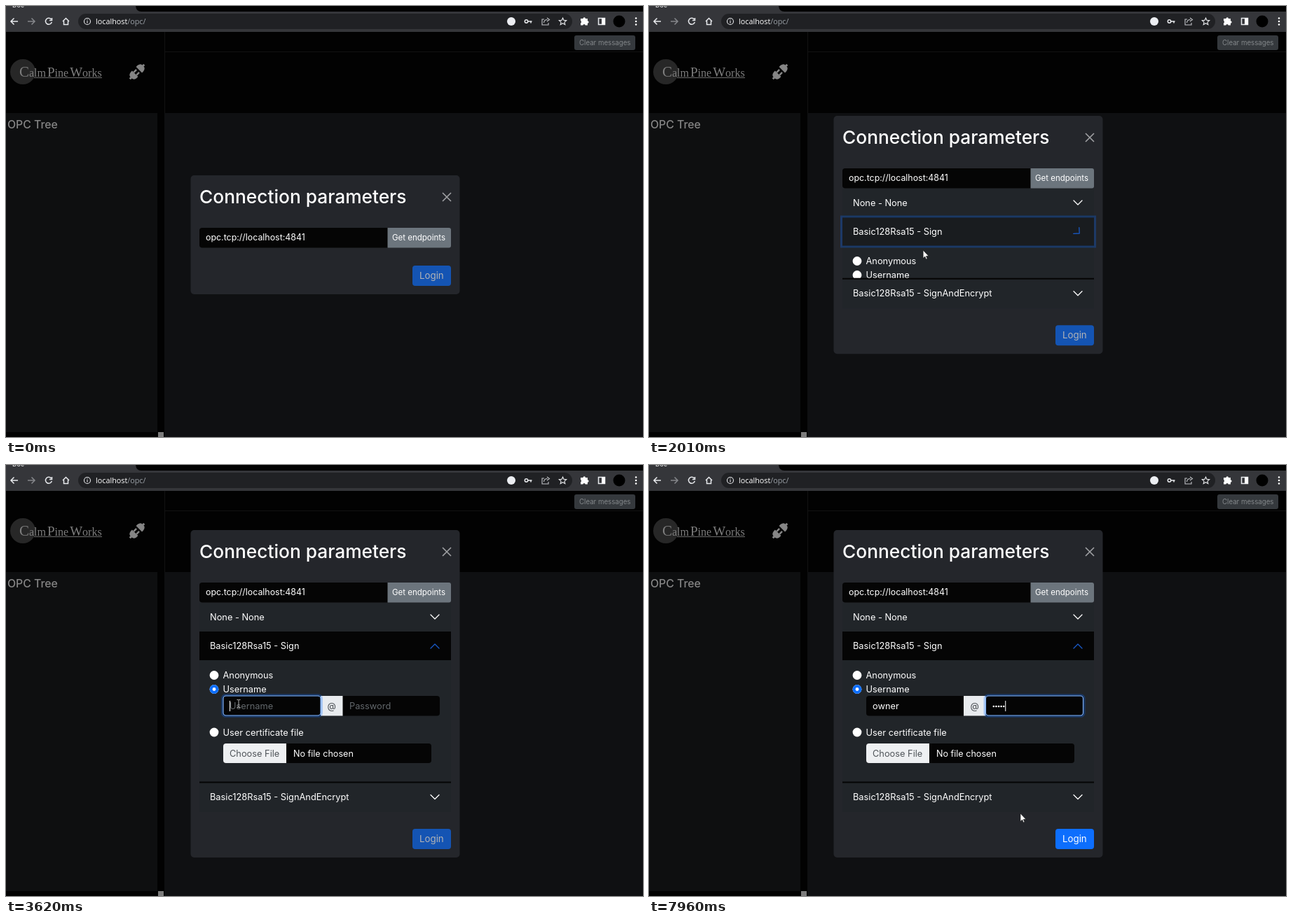
These frames come from a looping animation (909x616 px, 7.99 s). An HTML page:

```html
<!DOCTYPE html>
<html lang="en">
<head>
<meta charset="utf-8">
<title>Connection parameters</title>
<style>
html, body { margin: 0; width: 100%; height: 100%; overflow: hidden; background: #000; }
svg { display: block; width: 909px; height: 616px; font: 12.8px Inter, sans-serif; }
text { white-space: pre; }
.line { fill: none; stroke: #e8eaed; stroke-width: 1.5; }
.light { fill: #fff; }
.field { fill: #050505; }
.item { fill: #212529; }
.hint { fill: #62676b; }
.chev { fill: none; stroke: #fff; stroke-width: 1.3; stroke-linecap: round; stroke-linejoin: round; }
.ring rect, .ring circle { fill: none; stroke: #0d6efd; stroke-opacity: .28; stroke-width: 3; }
.ring .edge { stroke: #86b7fe; stroke-opacity: 1; stroke-width: 1.1; }
</style>
</head>
<body>
<svg viewBox="0 0 909 616">
  <defs><clipPath id="clip"><rect id="clipBox" x="270" y="186" width="370"/></clipPath></defs>

  <!-- browser bar -->
  <rect width="909" height="616" fill="#020202"/>
  <path d="M0 0H185Q186 8 193 8H909V37H0Z" fill="#35363a"/>
  <text x="9" y="1.5" font-size="9" class="light">Doc</text>
  <rect x="103" y="11" width="705" height="22" rx="11" fill="#202124"/>
  <g class="line">
    <path d="M17 22H7M11.5 17.5L7 22l4.5 4.5"/>
    <path d="M31 22h10M36.5 17.5L41 22l-4.5 4.5" stroke="#85878b"/>
    <path d="M64.5 19A4.5 4.5 0 1 0 65.3 23M65.5 17v3.5h-3.5"/>
    <path d="M81 22l4.5-4.5L90 22M82.5 21.5v5h6v-5"/>
    <g stroke-width="1.1">
      <circle cx="116" cy="22" r="4.5"/><path d="M116 21.3v3.2M116 19.3v1"/>
      <path d="M768 19h-3v8h9v-3M767.5 24q.5-4.5 5-4.5M772 17l3.5 2.5-3.5 2.5" stroke="#c4c6ca"/>
      <path d="M794.5 17l1.5 3.4 3.7.3-2.8 2.4.9 3.6-3.3-2-3.3 2 .9-3.6-2.8-2.4 3.7-.3z"/>
    </g>
    <rect x="845.5" y="17.5" width="9" height="9"/>
  </g>
  <text x="128" y="26" font-family="'Open Sans', sans-serif" font-size="10.8" class="light">localhost<tspan fill="#9aa0a6">/opc/</tspan></text>
  <circle cx="721" cy="22" r="6" fill="#eceef2"/>
  <g id="key" class="line" stroke-width="1.3"><circle cx="742.5" cy="22" r="2.2"/><path d="M745 22h5.5M749 22v2.5"/></g>
  <path d="M820 18h3.5a1.7 1.7 0 0 1 3.4 0h3v3.3a1.7 1.7 0 0 1 0 3.4v2.8h-3.3a1.6 1.6 0 0 0-3.2 0H820v-3.3a1.6 1.6 0 0 0 0-3z" class="light"/>
  <rect x="850" y="17.5" width="5" height="9" class="light"/>
  <circle cx="875" cy="22" r="8.5"/>
  <g class="light"><circle cx="899" cy="17.5" r="1.3"/><circle cx="899" cy="22" r="1.3"/><circle cx="899" cy="26.5" r="1.3"/></g>

  <!-- page behind the dialog -->
  <rect y="153" width="216" height="456" fill="#0e0f10"/>
  <rect x="226" y="153" width="683" height="463" fill="#0f1012"/>
  <path d="M226.5 37V153M226 65.5H909" stroke="#121212"/>
  <rect x="217" y="609" width="8" height="7" fill="#7c7c7c"/>
  <circle cx="24" cy="94" r="18" fill="#272727"/>
  <text x="19" y="101" font-family="'Liberation Serif', serif" font-size="16" fill="#7d7d7d"><tspan font-size="21">C</tspan>alm<tspan font-size="19" dx="2">P</tspan>ine<tspan font-size="19" dx="2">W</tspan>orks</text>
  <path d="M40 102.5H137" stroke="#6c6c6c"/>
  <g transform="translate(187 94) rotate(-45)" fill="#858585">
    <path d="M-4-6v12h-3q-5-1-5-4.500h-2.500v-3h2.500q0-3.500 5-4.500zM4-6v12h3q5-1 5-4.500h2.500v-3h-2.500q0-3.500-5-4.500z"/>
    <path d="M-4-4h5.500v2.500h-5.500zM-4 1.500h5.500v2.500h-5.500z"/>
  </g>
  <text x="2" y="175" font-size="15.8" font-weight="500" fill="#858585">OPC Tree</text>
  <rect x="811" y="42" width="87" height="21" rx="3" fill="#35393d"/>
  <text x="818" y="56" font-size="9.7" fill="#83878a">Clear messages</text>

  <!-- dialog, y measured from its top edge -->
  <g id="modal">
    <rect id="panel" x="263.5" width="384" rx="5" fill="#24262b"/>
    <text x="276" y="40" font-size="26.3" font-weight="500" class="light">Connection parameters</text>
    <path d="M623 25l12 12M635 25l-12 12" stroke="#a0a1a4" stroke-width="1.6"/>
    <path d="M545 75H280a4 4 0 0 0-4 4v20.500a4 4 0 0 0 4 4H545z" class="field"/>
    <text x="285" y="93.3" font-size="12.4" class="light">opc.tcp://localhost:4841</text>
    <path d="M544.5 75h87.500a3 3 0 0 1 3 3v22.500a3 3 0 0 1-3 3h-87.500z" fill="#6c757d"/>
    <path id="hover" d="M544.5 75h87.500a3 3 0 0 1 3 3v22.500a3 3 0 0 1-3 3h-87.500z" fill="#565d63"/>
    <text x="551" y="93" font-size="11.5" class="light">Get endpoints</text>

    <g id="list">
      <rect x="276" y="104" width="359" height="82.5" class="item"/>
      <text x="291" y="128.5" class="light">None - None</text>
      <path d="M606 121l6 6 6-6" class="chev"/>
      <g clip-path="url(#clip)">
        <rect x="276" y="186" width="359" height="175" class="item"/>
        <g class="light">
          <circle cx="297" cy="207.5" r="6.4"/>
          <circle cx="297" cy="227.5" r="6.4"/>
          <circle cx="297" cy="289" r="6.4"/>
          <text x="309.5" y="212">Anonymous</text>
          <text x="309.5" y="232">Username</text>
          <text x="309.5" y="293.5">User certificate file</text>
        </g>
        <g id="picked"><circle cx="297" cy="227.5" r="6.4" fill="#0d6efd"/><circle cx="297" cy="227.5" r="2.4" class="light"/></g>
        <g class="ring" id="radioRing"><circle cx="297" cy="227.5" r="7.6"/></g>
        <rect x="310" y="237" width="309" height="28.5" rx="4" class="field"/>
        <rect x="449" y="237" width="31.5" height="28.5" fill="#e9ecef"/>
        <text x="464.8" y="256" text-anchor="middle" fill="#43484d">@</text>
        <text id="userHint" x="319" y="255.7" class="hint">Username</text>
        <text id="passHint" x="490" y="255.7" class="hint">Password</text>
        <text id="user" x="319" y="255.7" class="light"></text>
        <g id="dots" class="light"></g>
        <g class="ring" id="userRing"><rect x="308.5" y="235.7" width="142" height="30.6" rx="5"/><rect class="edge" x="310" y="237" width="139" height="28" rx="4"/></g>
        <g class="ring" id="passRing"><rect x="479" y="235.7" width="142" height="30.6" rx="5"/><rect class="edge" x="480.5" y="237" width="139" height="28" rx="4"/></g>
        <rect id="caret" y="244" width="1" height="15" class="light"/>
        <rect x="310" y="305" width="297" height="28" rx="4" class="field"/>
        <path d="M400 305h-86a4 4 0 0 0-4 4v20a4 4 0 0 0 4 4h86z" fill="#eef0f2"/>
        <text x="319" y="323.5" fill="#50555a">Choose File</text>
        <text x="410" y="323.5" font-size="12.6" class="light">No file chosen</text>
      </g>
      <rect id="headDark" x="276" y="145" width="359" height="41" class="field"/>
      <g class="ring" id="headRing"><rect x="274.5" y="144" width="362" height="43"/></g>
      <text x="291" y="170" class="light">Basic128Rsa15 - Sign</text>
      <path id="headChev" d="M-6-3l6 6 6-6" class="chev"/>
      <g id="last">
        <rect x="276" y="187" width="359" height="42" class="item"/>
        <path id="rule" d="M276 186.5h359" stroke="#050505" stroke-width="2"/>
        <text x="291" y="212" class="light">Basic128Rsa15 - SignAndEncrypt</text>
        <path d="M606 204.5l6 6 6-6" class="chev"/>
      </g>
    </g>
    <g id="login">
      <rect x="580" y="-41" width="55" height="29" rx="4" fill="#0d6efd"/>
      <text x="590" y="-22" font-size="13.3" class="light">Login</text>
    </g>
  </g>

  <g id="pointer">
    <path id="arrow" d="M0 0v11.500l2.600-2.400 1.700 3.900 1.700-.7-1.700-3.800h3.600z" fill="#fff" stroke="#111" stroke-width=".6"/>
    <path id="hand" d="M-1 0q1.500-1 2 .5v4.500l4 1q1.200.5 1 2l-.8 5h-5.700l-3.500-4.500q0-1.500 1.500-1l1.500 1z" fill="#fff" stroke="#111" stroke-width=".7"/>
    <path id="beam" d="M-2.500-5.500h2l.5.500.5-.5h2M0-5V5M-2.500 5.500h2l.5-.5.5.5h2" fill="none" stroke="#b4b4b4"/>
  </g>
</svg>
<script>
const LOOP = 7990;
const $ = {};
document.querySelectorAll('[id]').forEach(el => $[el.id] = el);

const NAME = 'owner';
const nameTimes = [4240, 4440, 4640, 4770, 4900];
const passTimes = [6000, 6160, 6360, 6590, 6820];
const caretOn = [[3560, 4010], [4240, 5230], [5280, 5750], [6000, 7350], [7850, LOOP]];
// time, x, y of the pointer's hot spot
const path = [
  [270, 874, 617], [1020, 597, 331], [1230, 597, 331], [1860, 392, 349], [2040, 391, 349],
  [2250, 329, 333], [2700, 297, 321], [2960, 297, 321], [3270, 332, 341],
  [7550, 332, 341], [7670, 447, 468], [7830, 447, 468], [7960, 530, 498]
];
const shapes = [[0, 'arrow'], [960, 'hand'], [1980, 'arrow'], [2180, 'beam'], [2320, 'arrow'], [3120, 'beam'], [7570, 'arrow']];

for (let i = 0; i < 5; i++)
  $.dots.insertAdjacentHTML('beforeend', `<circle cx="${491.8 + 3.6 * i}" cy="252" r="1.3"/>`);

const ramp = (t, a, b) => Math.min(1, Math.max(0, (t - a) / (b - a)));
const pulse = (t, a, b) => ramp(t, a, a + 120) - ramp(t, b, b + 120);
const count = (t, times) => times.filter(x => t >= x).length;
const fade = (el, v) => el.setAttribute('opacity', v);
const show = (el, on) => el.setAttribute('visibility', on ? 'inherit' : 'hidden');
const move = (el, x, y, extra = '') => el.setAttribute('transform', `translate(${x} ${y})${extra}`);

// the standard CSS "ease" curve
function ease(u) {
  let lo = 0, hi = 1, s;
  for (let i = 0; i < 20; i++) {
    s = (lo + hi) / 2;
    if (.75 * s * (1 - s) + s ** 3 < u) lo = s; else hi = s;
  }
  return .3 * s * (1 - s) ** 2 + 3 * s * s * (1 - s) + s ** 3;
}

function pointerAt(t) {
  const i = path.findIndex(p => p[0] > t);
  if (i < 0) return path.at(-1).slice(1);
  if (i === 0) return path[0].slice(1);
  const [a, b] = [path[i - 1], path[i]];
  let u = ramp(t, a[0], b[0]);
  if (b[0] < 2000) u = u * u * (3 - 2 * u);
  return [a[1] + (b[1] - a[1]) * u, a[2] + (b[2] - a[2]) * u];
}

function draw(t) {
  const listed = t >= 1230;
  const u = ramp(t, 1956, 2250);
  const open = u === 0 || u === 1 ? u : ease(u);
  const body = 174 * open;
  const height = 170 + (listed ? 124 : 0) + body;

  move($.modal, 0, Math.round(327 - height / 2));
  $.panel.setAttribute('height', height);
  show($.list, listed);
  $.clipBox.setAttribute('height', body);
  move($.last, 0, body);
  show($.rule, listed && body > 0);
  move($.login, 0, height);
  fade($.login, t < 4260 ? .65 : 1);
  fade($.hover, listed ? 0 : ramp(t, 1060, 1150));

  fade($.headDark, open);
  move($.headChev, 612, 166, ` rotate(${-180 * open})`);
  $.headChev.style.stroke = t < 1950 ? '#fff' : '#185ac8';
  fade($.headRing, pulse(t, 1860, 2960));
  fade($.radioRing, pulse(t, 2960, 3500));
  fade($.userRing, pulse(t, 3500, 5230));
  fade($.passRing, ramp(t, 5230, 5360));
  show($.picked, t >= 2960);
  show($.key, t < 4260 || t >= 6000);

  const typed = count(t, nameTimes), hidden = count(t, passTimes);
  $.user.textContent = NAME.slice(0, typed);
  show($.userHint, !typed);
  show($.passHint, !hidden);
  [...$.dots.children].forEach((dot, i) => show(dot, i < hidden));
  const nameWidth = typed ? $.user.getComputedTextLength() : 0;
  $.caret.setAttribute('x', t < 5230 ? 319 + nameWidth : 490 + 3.65 * hidden);
  show($.caret, caretOn.some(([a, b]) => t >= a && t < b));

  move($.pointer, ...pointerAt(t));
  show($.pointer, t >= 270);
  const shape = shapes.filter(s => t >= s[0]).pop()[1];
  for (const id of ['arrow', 'hand', 'beam']) show($[id], id === shape);
}

const start = performance.now();
function tick() {
  draw((performance.now() - start) % LOOP);
  requestAnimationFrame(tick);
}
tick();
</script>
</body>
</html>
```
